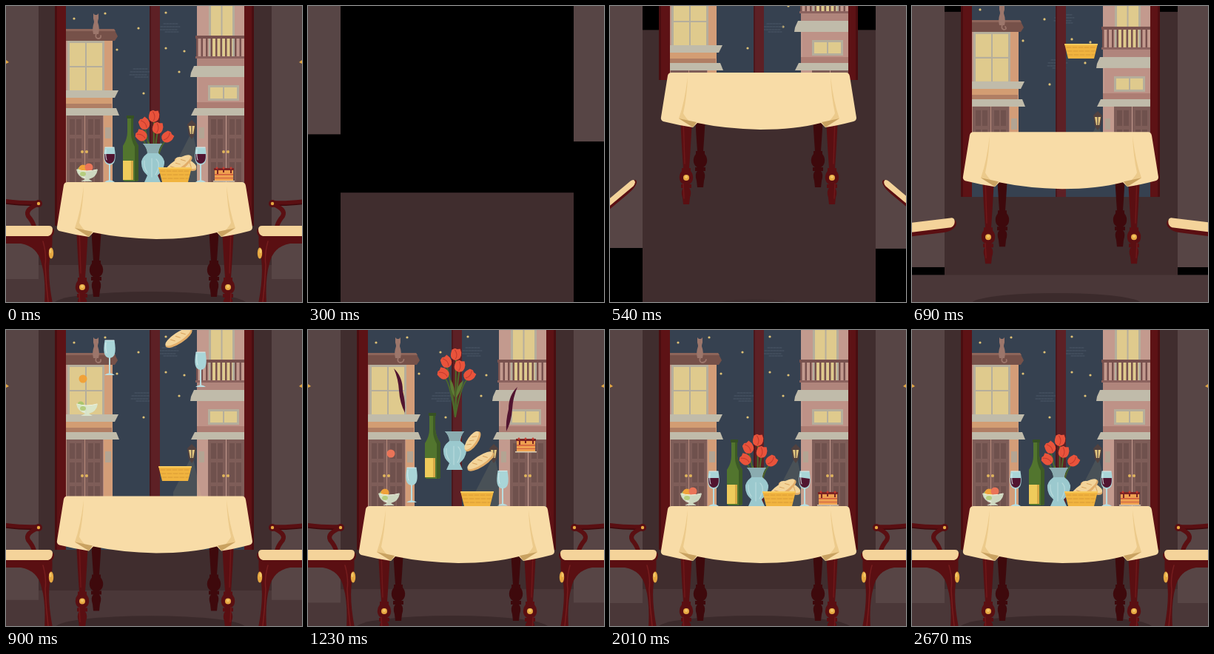
An HTML page with a canvas that plays this animation: 400 by 400 pixels, repeating every 2.7 s.

```html
<!DOCTYPE html>
<html lang="en">
<head>
<meta charset="utf-8">
<title>Dinner by the window</title>
<style>
html, body { margin: 0; height: 100%; overflow: hidden; background: #000; }
canvas { display: block; width: 100vw; height: 100vh; }
</style>
</head>
<body>
<canvas width="400" height="400"></canvas>
<script>
const c = document.querySelector('canvas').getContext('2d');
const LOOP = 2700, STEP = 30;
let t = 0;

// Drawing helpers
const rect = (color, x, y, w, h) => { c.fillStyle = color; c.fillRect(x, y, w, h); };
const shape = (color, d) => { c.fillStyle = color; c.fill(new Path2D(d)); };
const line = (color, width, d) => {
  c.strokeStyle = color; c.lineWidth = width; c.lineCap = 'round';
  c.stroke(new Path2D(d));
};
const oval = (color, x, y, rx, ry = rx, rot = 0) => {
  c.fillStyle = color; c.beginPath(); c.ellipse(x, y, rx, ry, rot, 0, 7); c.fill();
};
const at = (x, y, draw, deg = 0) => {
  c.save(); c.translate(x, y); c.rotate(deg * Math.PI / 180); draw(); c.restore();
};
const mirrored = (sum, draw) => {
  draw();
  c.save(); c.translate(sum, 0); c.scale(-1, 1); draw(); c.restore();
};
const clip = (d, draw) => { c.save(); c.clip(new Path2D(d)); draw(); c.restore(); };

// Timing helpers
const clamp = v => Math.max(0, Math.min(1, v));
// cubic ease-out ending at `end`, passing through `offset` at time `when`
const settle = (when, offset, end) => offset * (Math.max(0, end - t) / (end - when)) ** 3;
const approach = (start, tau) => t < start ? 0 : 1 - Math.exp((start - t) / tau);

function room() {
  const mid = 402 * (1 - approach(245, 120)) - 2;
  rect('#402d2e', 44, mid, 315, 402);
  rect('#4a3738', 0, 350 + 50 * (1 - approach(545, 110)), 400, 60);
  const grow = approach(500, 90);
  if (grow) oval('#3b2a2b', 195, 402, 130 * grow, 16 * grow);
  rect('#574545', 0, 0, 44, 369 * approach(201, 156));
  rect('#574545', 359, 0, 41, 369 * approach(191, 159));
}

function pane(x, y, w, h, cols, bar) {
  rect('#b5ae9c', x, y, w, h);
  const pw = (w - 4) / cols;
  for (let i = 0; i < cols; i++) {
    rect('#dfca8d', x + 3 + i * pw, y + 3, pw - 2, h - 6);
    if (bar) rect('#b5ae9c', x + 2, bar, w - 4, 2);
  }
}

function doors(x) {
  for (const dx of [0, 25]) {
    rect('#7e5d58', x + dx, 148, 24, 90);
    for (const [y, h] of [[153, 21], [179, 27], [211, 27]]) {
      rect('#6f514d', x + dx + 4, y, 7, h);
      rect('#6f514d', x + dx + 13, y, 7, h);
    }
  }
  oval('#e0b45c', x + 21, 197, 2);
  oval('#e0b45c', x + 27, 197, 2);
}

function cat() {
  const sway = 2 * Math.sin(t / LOOP * Math.PI * 6);
  shape('#9c766b', 'M118 10l2 2h3l2 -2v7q-1 3 -1 5q3 8 1 16h-7q-2 -8 1 -16q0 -2 -1 -5z');
  line('#9c766b', 1.8, `M122 37q-2 6 2 7q5 0 ${4 + sway} -4`);
}

function leftHouse() {
  rect('#d39d78', 81, 46, 63, 192);
  rect('#c0968a', 81, 47, 52, 68);
  pane(83, 47, 50, 70, 2, 81);
  shape('#765149', 'M81 31H146L151 41L147 47H81z');
  shape('#8d655a', 'M81 31H146L148 34H81z');
  shape('#c0bbaa', 'M81 114H152L147 124H81z');
  shape('#d39d73', 'M81 124H143V130L135 137H81z');
  shape('#b07e64', 'M81 132H143V139H81z');
  shape('#c0bbaa', 'M81 138H149L153 148H81z');
  rect('#b78b7c', 81, 148, 51, 90);
  doors(82);
  rect('#b3a493', 134, 164, 8, 15);
  cat();
}

function rightHouse() {
  rect('#c39a8e', 258, 0, 64, 238);
  pane(274, -5, 35, 76, 2, 0);
  rect('#78514e', 256, 40, 66, 4);
  for (let x = 257; x < 322; x += 6.5) rect('#78514e', x, 44, 2.5, 25);
  rect('#8b625e', 256, 68, 66, 3);
  rect('#b0857c', 258, 71, 64, 10);
  shape('#c0bbaa', 'M254 81H322V96H249L250 90z');
  rect('#be9287', 260, 96, 62, 34);
  pane(273, 107, 42, 21, 2);
  rect('#ad7d73', 258, 130, 64, 8);
  shape('#c0bbaa', 'M255 138H322V148H250z');
  doors(273);
  rect('#b3a493', 261, 164, 7, 15);
}

function lantern() {
  shape('rgba(225,205,150,.11)', 'M249 174L226 219V238H267L253 174z');
  shape('#51413f', 'M245 160L251 154L257 160L255 174L251 180L247 174z');
  shape('#e5c980', 'M247 162H255L253 173H249z');
  line('#51413f', 1.2, 'M251 162V174');
}

function outdoors() {
  rect('#364150', 81, -300, 241, 700);
  for (const [x, y] of [[92, 17], [134, 10], [179, 30], [150, 59], [216, 9],
    [216, 57], [234, 89], [241, 61], [186, 118]]) oval('#dfc276', x, y, 1.6);
  const drift = settle(540, 40, 1110);
  c.setLineDash([3, 1]);
  for (const [x, y] of [[168 + drift, 85], [209 - drift, 24]])
    line('#4b5766', 1, `M${x + 4} ${y}h20M${x} ${y + 4}h26M${x - 1} ${y + 8}h24M${x + 6} ${y + 11}h18`);
  c.setLineDash([]);
  leftHouse();
  rightHouse();
  lantern();
}

function windowFrame() {
  const bottom = 297 + settle(540, -197, 900);
  if (bottom <= 0) return;
  rect('#4a0d10', 66, 0, 269, bottom);
  rect('#5d1215', 69, 0, 12, bottom);
  rect('#5d1215', 322, 0, 10, bottom);
  clip(`M81 0H322V${bottom}H81z`, () => {
    at(0, settle(540, -61, 900), outdoors);
    rect('#5d2025', 194, 0, 14, 400);
    rect('#4c171c', 194, 0, 2, 400);
  });
}

function tableLeg(color, x, y) {
  at(x, y, () => shape(color, 'M-8 -80H8Q6 -40 4 -13H6V-9Q10 -4 9 2Q8 7 4 9H7V14H4Q8 18 5 27L4 36H-4L-5 27Q-8 18 -4 14H-7V9H-4Q-8 7 -9 2Q-10 -4 -6 -9V-13H-4Q-6 -40 -8 -80z'));
}

function table() {
  mirrored(403, () => {
    tableLeg('#3e090c', 122, 357);
    tableLeg('#5a0f12', 103, 380);
    line('#6f181a', 1.5, 'M99 300L101 361M99 388L100 408');
    oval('#e6a842', 103, 380, 4);
    oval('#f3c767', 103, 379, 2);
  });
  shape('#f8dca7', 'M83 238H319Q323 238 324 243L333 299Q333 303 329 304Q306 310 291 312L285 306Q250 315 203 315Q156 314 118 306L112 312Q92 309 72 304Q68 302 69 298L78 242Q79 238 83 238z');
  mirrored(403, () => {
    shape('#ecca8b', 'M105 243Q101 278 93 300L112 309Q101 298 99 293Q104 270 105 243z');
    shape('#c9a261', 'M93 300L117 305L112 312z');
  });
}

function bowl() {
  const drop = settle(900, -121, 1230);
  oval('#a9c66c', 101, 222 + drop, 4.5);
  oval('#f0a23a', 104, 220 + settle(900, -154, 1230), 5.5);
  oval('#ea7458', 112, 218 + settle(1230, -51, 1560), 5.5);
  at(0, drop, () => {
    shape('rgba(219,233,208,.88)', 'M95 221Q109 225 124 221Q122 232 112 234L117 237H101L107 234Q97 231 95 221z');
    line('#eef3df', 1, 'M96 221Q109 225 123 221M100 226Q102 231 107 232');
    oval('#b5cd7e', 104, 227, 4, 3);
  });
}

function glass(x, y, fillStart, way) {
  const cup = 'M-6.5 -47C-9 -32 -8 -24 0 -23C8 -24 9 -32 6.5 -47z';
  at(x, y, () => {
    shape('#a9d5d8', cup);
    rect('#b9dde0', -1, -24, 2, 23);
    shape('#b9dde0', 'M-7 0Q-5 -2 0 -3Q5 -2 7 0z');
    const full = clamp((t - fillStart) / 110);
    const fade = clamp((2320 - t) / 960);
    const tilt = way * 9 * fade * Math.sin((t - fillStart) / 70);
    if (full) clip('M-6 -45C-8 -32 -7 -26 0 -25C7 -26 8 -32 6 -45z', () =>
      shape('#511430', `M-9 ${-23 - 15 * full - tilt}L9 ${-23 - 15 * full + tilt}V-20H-9z`));
    line('#d9eeee', 1, 'M-6 -47H6M-5 -44Q-6 -35 -4 -30');
  });
}

function pour() {
  const k = t - 1230;
  if (k < -150 || k > 230) return;
  const stream = 'M116 52Q128 63 128 82Q132 98 131 112Q124 98 123 82Q122 66 116 52z';
  clip('M0 0H400V208H0z', () => {
    at(k * .07, k * .7, () => shape('#511430', stream));
    at(399 - k * .05, 25 + k * .7, () => { c.scale(-1, 1); shape('#511430', stream); });
  });
}

function bottle() {
  shape('#52752e', 'M164 149Q168 147 172 149V170Q173 180 179 189V234Q179 237 176 237H161Q158 237 158 234V189Q164 180 164 170z');
  shape('#3d5a25', 'M169 148L172 149V170Q173 180 179 189V234Q179 237 174 237V190Q169 181 169 173z');
  rect('#365123', 163, 148, 10, 4);
  rect('#efcb5b', 158, 209, 14, 26);
  rect('#d7a945', 169, 209, 3, 26);
}

function flowers() {
  const heads = [[200, 149, 5], [187, 159, -30], [183, 175, -55], [205, 165, 12], [218, 177, 50]];
  for (const [x, y] of heads)
    line('#4c692b', 2, `M${x} ${y + 5}Q${x + (199 - x) * .5} 181 199 233`);
  shape('#5d7b34', 'M197 205Q190 193 193 183Q199 193 198 207zM200 206Q201 190 210 184Q208 196 201 207z');
  for (const [x, y, deg] of heads) at(x, y, () => {
    shape('#e9533b', 'M-6 -6L-2 -8L1 -7L5 -8L7 -3Q8 7 0 8Q-8 7 -7 -1z');
    line('#c23a2d', 1, 'M-2 -6Q3 0 0 6');
  }, deg);
}

function vase() {
  shape('#9bc9ce', 'M185 186H211Q206 192 206 199Q215 206 214 213Q213 222 205 229L209 238H187L191 229Q183 222 183 213Q182 206 191 199Q191 192 185 186z');
  shape('#8bacb0', 'M185 186H211Q206 192 206 199H191Q191 192 185 186z');
  line('#b7dadc', 1.2, 'M187 209Q186 218 191 225M197 206V231M203 207Q210 214 202 228');
}

function bread(x, y, deg, length, width) {
  at(x, y, () => {
    oval('#e2ad69', 0, 1, length / 2, width / 2);
    oval('#f3d49a', 0, -1, length / 2 - 1, width / 2 - 1);
    for (let i = -1; i < 2; i++)
      line('#d9a35e', 1, `M${i * length / 5 - 2} ${-width / 4}l4 ${width / 3}`);
  }, deg);
}

function basket() {
  bread(243 + settle(1230, -21, 1661), 213 + settle(1230, -63, 1661), 25 + settle(1230, -80, 1661), 32, 13);
  bread(233, 214 + settle(1230, -37, 1661), -33, 42, 14);
  at(0, settle(900, -34, 1200), () => {
    shape('#f1b43f', 'M206 218H251L246 238H211z');
    c.setLineDash([6, 2]);
    line('#d99a35', 1, 'M209 223H248M210 228H247M211 233H246');
    c.setLineDash([]);
    line('#f9ca5c', 2, 'M207 219H250');
  });
}

function cake() {
  rect('#efa050', 282, 220, 25, 16);
  rect('#cf5a3c', 282, 227, 25, 1.5);
  rect('#cf5a3c', 282, 232, 25, 1);
  shape('#7c2424', 'M281 219H308V222H305V226H303V222H295V225H293V222H287V227H285V222H281z');
  for (const x of [285, 294, 304]) oval('#c73d32', x, 219, 1.4);
  rect('#d9cfb5', 280, 236, 29, 1.5);
}

function chair() {
  at(settle(700, -70, 880), 0, () => {
    line('#5a0f12', 6, 'M-40 264H0Q25 267 43 266');
    line('#3e090c', 1.5, 'M-40 267H0Q25 270 40 269');
    line('#5a0f12', 6, 'M43 268Q25 275 30 284Q36 291 38 298');
    oval('#5a0f12', 44, 267, 5);
    oval('#e6a842', 44, 267, 2.2);
    shape('#5a0f12', 'M-40 311L62 307Q64 325 59 342Q56 366 63 402H52Q54 368 48 348Q43 325 20 321H-40z');
    line('#761d1e', 1.5, 'M50 318Q55 336 53 350Q54 376 57 400');
    oval('#e6a842', 61, 334, 3.2, 7.5);
    oval('#f3c767', 60, 331, 1.6, 3);
  });
  const x = 63 + settle(540, -29, 880), y = 305 + settle(540, -68, 880);
  at(x, y, () => {
    c.scale(1, Math.max(.1, 1 - settle(540, .45, 880)));
    shape('#5a0f12', 'M-110 3H-6L1 -4Q4 3 -3 8Q-8 12 -18 12H-110z');
    shape('#f4d39a', 'M-110 -8H-5Q0 -8 0 -3Q0 4 -6 6H-110z');
  }, settle(540, -40, 880));
}

function wallLamps() {
  if (t > 700) mirrored(400, () => shape('#e6a842', 'M0 73L4 76L0 78z'));
}

function scene() {
  room();
  windowFrame();
  wallLamps();
  if (t > 340) at(0, settle(540, -148, 1195), table);
  bowl();
  pour();
  at(0, settle(1230, -36, 1530), bottle);
  at(0, settle(1230, -116, 1620), flowers);
  at(0, settle(1230, -49, 1550), vase);
  basket();
  glass(140, 238 + settle(900, -177, 1374), 1350, 1);
  glass(263, 238 + settle(900, -161, 1290), 1320, -1);
  at(0, settle(1230, -72, 1560), cake);
  mirrored(404, chair);
}

function frame(now) {
  const time = Math.floor(now % LOOP / STEP) * STEP;
  rect('#000', 0, 0, 400, 400);
  if (time < 60 || time >= 210) {
    t = time < 60 ? LOOP : time;
    scene();
    if (time === 30) rect('rgba(0,0,0,.5)', 0, 0, 400, 400);
  }
  requestAnimationFrame(frame);
}
requestAnimationFrame(frame);
</script>
</body>
</html>
```
